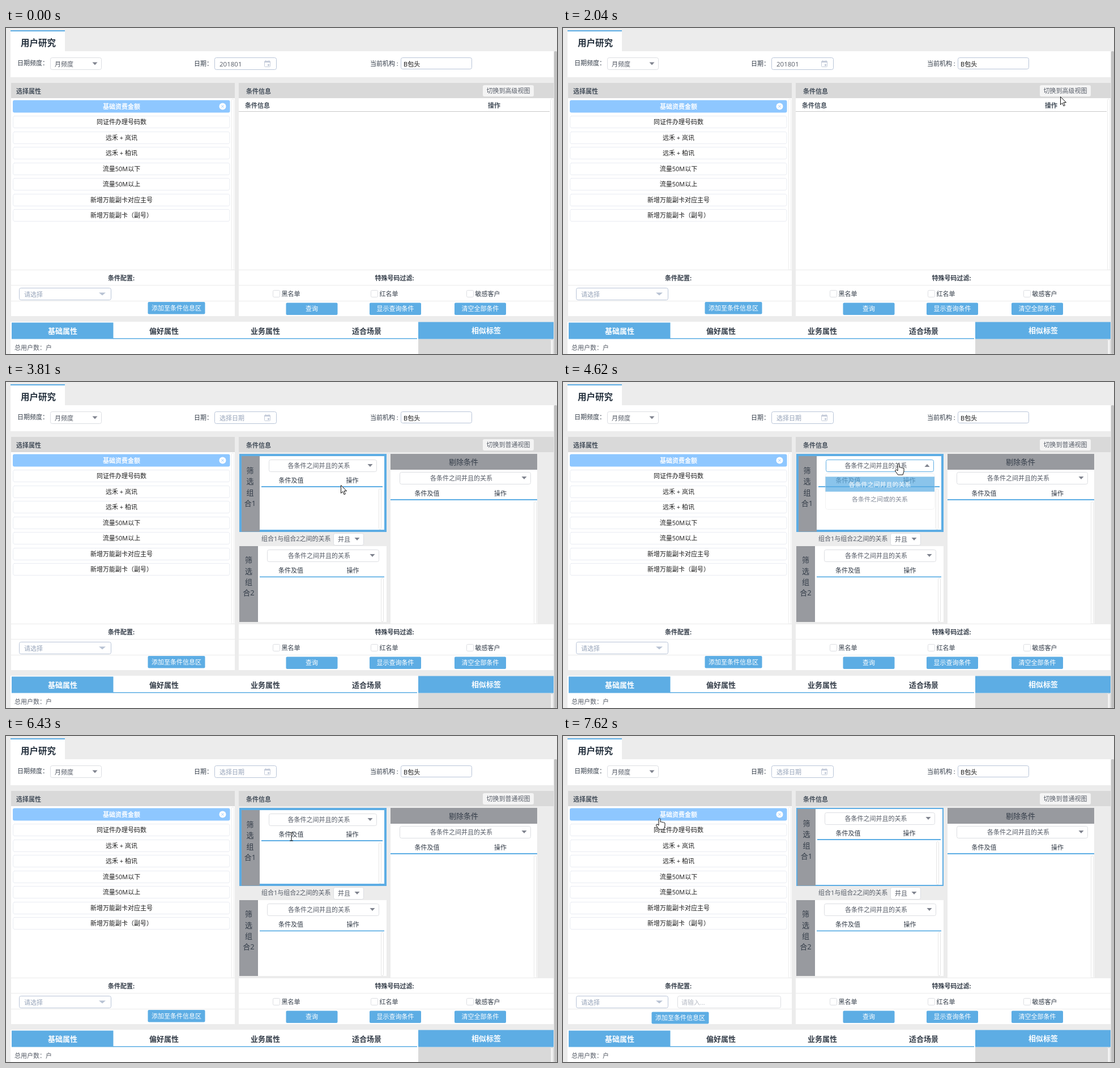
These frames come from a looping animation (973x576 px, 8 s). An HTML page with a canvas:

```html
<!DOCTYPE html>
<html lang="zh-CN">
<head>
<meta charset="utf-8">
<style>
html, body { margin: 0; width: 100%; height: 100%; overflow: hidden; background: #ececec; }
canvas { display: block; }
</style>
</head>
<body>
<canvas id="stage" width="973" height="576"></canvas>
<script>
const c = document.getElementById('stage').getContext('2d');
const LOOP = 8000;
const BLUE = '#5dade4', PICK = '#8ec7ff', PAGE = '#ececec', BAR = '#d9d9d9', SLATE = '#989a9f';
const INK = '#333c48', SOFT = '#555b66', HINT = '#97a4ba', EDGE = '#dcdee2', FIELD = '#b9c5d8', ICON = '#c5ccda';

const items = ['基础资费金额', '同证件办理号码数', '远禾 + 岚讯', '远禾 + 柏讯', '流量50M以下',
  '流量50M以上', '新增万能副卡对应主号', '新增万能副卡（副号）'];

// time, x, y, shape
const pointer = [
  [0, 0, 0, ''], [930, 33, 4, 'arrow'], [1080, 38, 53, 'arrow'], [1230, 130, 78, 'arrow'],
  [1360, 286, 113, 'arrow'], [1510, 540, 119, 'arrow'], [1630, 717, 125, 'arrow'],
  [1780, 853, 125, 'arrow'], [1920, 868, 123, 'arrow'], [2040, 878, 121, 'arrow'],
  [2170, 883, 119, 'hand'], [2290, 885, 117, 'hand'], [2980, 884, 116, 'hand'],
  [3260, 743, 139, 'arrow'], [3410, 640, 165, 'arrow'], [3540, 593, 183, 'arrow'],
  [3690, 586, 180, 'arrow'], [3810, 591, 182, 'arrow'], [4090, 592, 156, 'arrow'],
  [4230, 593, 144, 'hand'], [4890, 590, 162, 'hand'], [5010, 581, 176, 'hand'],
  [5940, 540, 174, 'arrow'], [6060, 506, 178, 'beam'], [6430, 504, 178, 'beam'],
  [6570, 430, 300, 'arrow'], [6690, 300, 428, 'arrow'], [6810, 190, 330, 'hand'],
  [6930, 144, 262, 'arrow'], [7080, 150, 218, 'hand'], [7200, 160, 172, 'hand'],
  [7320, 168, 145, 'hand'], [7470, 170, 145, 'hand'], [7620, 171, 145, 'hand']
];
// time, opacity of the open list
const dropdown = [[0, 0], [4380, .2], [4500, .45], [4620, .72], [4740, 1],
  [5280, .7], [5400, .4], [5540, .15], [5660, 0]];
// time, row, strength
const rowHover = [[0, 0, 0], [6810, 7, 1], [6930, 7, .6], [7080, 3, .6], [7200, 1, .7], [7320, 1, .3], [7470, 0, 0]];

const shapes = {
  arrow: new Path2D('M.5 .5V14.5L3.8 11.5L6 16.8L8.3 15.8L6 10.6H10.5Z'),
  hand: new Path2D('M-2 12V1.5Q-.5-.8 1 1.5V7Q2.5 5.8 4 7.5Q5.5 6.5 6.5 8Q8 7.3 9 9V14L7 20H-1.5L-6.5 13Q-6.5 10.5-4 11L-2 13Z'),
  beam: new Path2D('M-3-7H3M0-7V7M-3 7H3')
};

const at = (keys, t) => keys.filter(k => k[0] <= t).pop();

function rect(x, y, x2, y2, color) {
  c.fillStyle = color;
  c.fillRect(x, y, x2 - x, y2 - y);
}

function box(x, y, x2, y2, fill, edge, r = 3) {
  c.beginPath();
  const o = edge ? .5 : 0;
  c.roundRect(x + o, y + o, x2 - x - 2 * o, y2 - y - 2 * o, r);
  if (fill) { c.fillStyle = fill; c.fill(); }
  if (edge) { c.strokeStyle = edge; c.lineWidth = 1; c.stroke(); }
}

// y is the middle of the line
function text(s, x, y, color = INK, align = 'left', size = 11, weight = 400) {
  c.font = `${weight} ${size}px "Open Sans", "Noto Sans CJK SC", "Noto Sans CJK", sans-serif`;
  c.textAlign = align;
  c.fillStyle = color;
  c.fillText(s, x, y + size * .38);
}
const mid = (s, x, y, color, size, weight) => text(s, x, y, color, 'center', size, weight);
const heading = (s, x, y, align) => text(s, x, y, '#46505c', align, 11, 700);

function triangle(x, y, color = '#80848f', up = false, w = 4.5) {
  const d = up ? -2.5 : 2.5;
  c.beginPath();
  c.moveTo(x - w, y - d);
  c.lineTo(x + w, y - d);
  c.lineTo(x, y + d);
  c.fillStyle = color;
  c.fill();
}

function button(s, x, y, x2, y2) {
  box(x + .5, y + .5, x2 - .5, y2 - .5, BLUE, null, 2);
  mid(s, (x + x2) / 2, (y + y2) / 2, '#fff');
}

function relation(x, y, x2, edge = EDGE, up = false) {
  box(x, y, x2, y + 22, '#fff', edge);
  mid('各条件之间并且的关系', (x + x2) / 2 - 7, y + 11, SOFT);
  triangle(x2 - 12, y + 10.5, '#80848f', up);
}

function columns(x, x2, y) {
  mid('条件及值', x, y, INK);
  mid('操作', x2, y, INK);
}

function topBar(advanced) {
  rect(0, 0, 973, 576, PAGE);
  rect(8, 5, 104, 41, '#fff');
  rect(8, 4, 104, 6, BLUE);
  text('用户研究', 26, 26, '#26323f', 'left', 15.5, 700);
  rect(8, 41, 967, 87, '#fff');
  rect(967, 41, 973, 576, '#e6e6e6');
  box(968, 41, 973, 576, '#c1c1c1', null, 2);

  text('日期频度：', 20, 62);
  box(78, 52, 169, 74, '#fff', EDGE);
  text('月频度', 86, 63.5, SOFT);
  triangle(157, 63);

  text('日期：', 332, 63);
  box(368, 52, 478, 74, '#fff', FIELD);
  if (advanced) text('选择日期', 377, 63.5, HINT);
  else text('201801', 377, 63.5, SOFT, 'left', 11.5);
  box(456, 58, 467, 69, null, ICON, 1);
  rect(456, 59, 467, 61, ICON);
  rect(458, 57, 459, 59, ICON);
  rect(464, 57, 465, 59, ICON);
  rect(462, 64, 465, 67, ICON);

  text('当前机构 :', 643, 63);
  box(697, 52, 823, 73, '#fff', FIELD);
  text('B包头', 702, 63.5, '#111');
}

function leftPanel(t) {
  const extra = t >= 7620;
  rect(9, 97, 404, 124, BAR);
  heading('选择属性', 18, 111.5);
  rect(9, 124, 404, 509, '#fff');
  box(398, 125, 403, 428, null, '#ededed', 2);
  const [, row, strength] = at(rowHover, t);
  items.forEach((s, i) => {
    const y = 138.5 + i * 27.5, top = y - 11;
    const a = i ? (i === row ? strength : 0) : 1;
    if (a < 1) {
      c.setLineDash([1, 1]);
      box(12, Math.round(top), 395.5, Math.round(top) + 22, '#fff', '#d3d9e6');
      c.setLineDash([]);
    }
    c.globalAlpha = a;
    if (a) box(12, top, 395.5, top + 22, PICK);
    c.globalAlpha = 1;
    mid(s, 204, y, a ? '#fff' : '#1c1c1c', 11, i ? 400 : 700);
  });
  c.beginPath();
  c.arc(382.5, 138.5, 6, 0, 7);
  c.fillStyle = '#fff';
  c.fill();
  c.strokeStyle = PICK;
  c.lineWidth = 1;
  c.stroke(new Path2D('M380.5 136.5l4 4m0-4l-4 4'));

  for (const y of [427, 454, 482]) rect(9, y, 404, y + 1, '#ebebeb');
  mid('条件配置:', 203.5, 442, INK, 11, 700);
  box(23, 459, 186, 481, '#fff', FIELD);
  text('请选择', 32, 470.5, HINT);
  triangle(170, 470, '#b7c2d3', false, 6);
  if (extra) {
    box(202, 459, 385, 481, '#fff', EDGE);
    text('请输入...', 209, 470.5, '#b5bac4');
    button('添加至条件信息区', 156, 487, 258, 509);
  } else button('添加至条件信息区', 250, 483.5, 352, 506);
}

function sideLabel(n, x, y) {
  ['筛', '选', '组', '合' + n].forEach((s, i) => mid(s, x, y + i * 19.3, INK, 13));
}

function openList(a) {
  if (!a) return;
  c.save();
  c.globalAlpha = a;
  c.translate(0, 156);
  c.scale(1, .8 + .2 * a);
  // the background leaves out the highlighted row, so that fading stays even
  c.beginPath();
  c.roundRect(463.5, 6, 192.5, 67, 4);
  c.strokeStyle = '#e3e3e3';
  c.lineWidth = 1;
  c.stroke();
  c.rect(463.5, 12, 192.5, 28);
  c.fillStyle = '#fff';
  c.fill('evenodd');
  rect(463.5, 12, 656, 40, BLUE);
  mid('各条件之间并且的关系', 559.5, 27, '#fff', 11, 700);
  mid('各条件之间或的关系', 559.5, 54.5, '#515a6e');
  c.restore();
}

function advancedView(t) {
  const hot = t >= 3410 && t < 6570, d = hot ? 2 : 0, open = t >= 4380 && t < 5280;
  rect(411, 124, 967, 427, PAGE);

  rect(412, 127, 672, 265, BLUE);
  const b = hot ? 4 : 2;
  rect(412 + b, 127 + b, 672 - b, 265 - b, '#fff');
  rect(412 + b, 127 + b, 446 + d, 264.5, SLATE);
  sideLabel(1, 430 + d / 2, 154 + d);
  columns(503.5, 611.5, 171.5 + d);
  rect(449 + d, 182 + d, 667 - d, 184 + d, BLUE);
  box(659 - d / 2, 186 + d, 664 - d / 2, 263 - d, '#fff', '#e6e6e6', 2);
  relation(462 + d, 135 + d, 657 - d, t >= 4230 && t < 5400 ? BLUE : EDGE, open);

  text('组合1与组合2之间的关系', 451, 277, SOFT);
  box(578, 267, 632, 289, '#fff', EDGE);
  text('并且', 586, 278, SOFT);
  triangle(620, 277.5);

  rect(412, 290, 672, 424, '#fff');
  rect(412, 290, 445, 424, SLATE);
  sideLabel(2, 428.5, 314.5);
  relation(461, 296, 659);
  columns(503, 612.5, 333);
  rect(448, 343.5, 668, 345.2, BLUE);
  box(662, 346, 667, 424, '#fff', '#e6e6e6', 2);

  rect(679, 127, 938, 427, '#fff');
  rect(679, 127, 938, 155, SLATE);
  mid('剔除条件', 808, 141, INK, 13);
  relation(695, 159, 927);
  columns(743.5, 873, 196.5);
  rect(679, 207, 938, 209, BLUE);
  box(932, 211, 937, 428, '#fff', '#e6e6e6', 2);

  openList(at(dropdown, t)[1]);
}

function rightPanel(t, advanced) {
  rect(411, 97, 967, 124, BAR);
  heading('条件信息', 424, 112);
  const hover = t >= 2290 && t < 3410;
  box(842, 101, 932, 121, hover ? '#fff' : '#f4f4f4');
  mid(`切换到${advanced ? '普通' : '高级'}视图`, 887, 111, hover ? BLUE : SOFT);
  rect(411, 124, 967, 509, '#fff');
  if (advanced) advancedView(t);
  else {
    heading('条件信息', 422, 137);
    heading('操作', 862, 137, 'center');
    rect(411, 147, 960, 148, '#c9c9c9');
    box(961, 125, 966, 428, null, '#ededed', 2);
  }
  for (const y of [427, 454, 482]) rect(411, y, 967, y + 1, '#ebebeb');
  mid('特殊号码过滤:', 686, 442, INK, 11, 700);
  [['黑名单', 471], ['红名单', 644], ['敏感客户', 813]].forEach(([s, x]) => {
    box(x, 463, x + 13, 476, '#fff', EDGE, 2);
    text(s, x + 15.5, 469.5);
  });
  button('查询', 494, 485, 586, 507.5);
  button('显示查询条件', 641.5, 485, 733.5, 507.5);
  button('清空全部条件', 791.5, 485, 883.5, 507.5);
}

function bottomTabs() {
  rect(8, 519, 728, 576, '#fff');
  rect(10, 520.5, 189.5, 549.5, BLUE);
  rect(189, 548, 726, 549.5, BLUE);
  ['基础属性', '偏好属性', '业务属性', '适合场景'].forEach((s, i) =>
    mid(s, 100 + i * 179, 535.2, i ? INK : '#fff', 13, 700));
  rect(728, 550, 961, 576, BAR);
  box(961, 550, 967, 580, '#f2f2f2', '#d5d5d5', 2);
  rect(728, 519.5, 967, 549.5, BLUE);
  mid('相似标签', 848, 534.5, '#fff', 13, 700);
  text('总用户数：户', 15, 565, SOFT);
}

function drawPointer(t) {
  const [, x, y, kind] = at(pointer, t);
  if (!kind) return;
  c.save();
  c.translate(x, y);
  c.fillStyle = '#fff';
  c.strokeStyle = '#111';
  c.lineWidth = 1;
  if (kind !== 'beam') c.fill(shapes[kind]);
  c.stroke(shapes[kind]);
  c.restore();
}

function draw(now) {
  const t = now % LOOP, advanced = t >= 2830;
  topBar(advanced);
  leftPanel(t);
  rightPanel(t, advanced);
  bottomTabs();
  drawPointer(t);
}

let start;
function tick(now) {
  start ??= now;
  draw(now - start);
  requestAnimationFrame(tick);
}
draw(0);
requestAnimationFrame(tick);
</script>
</body>
</html>
```
